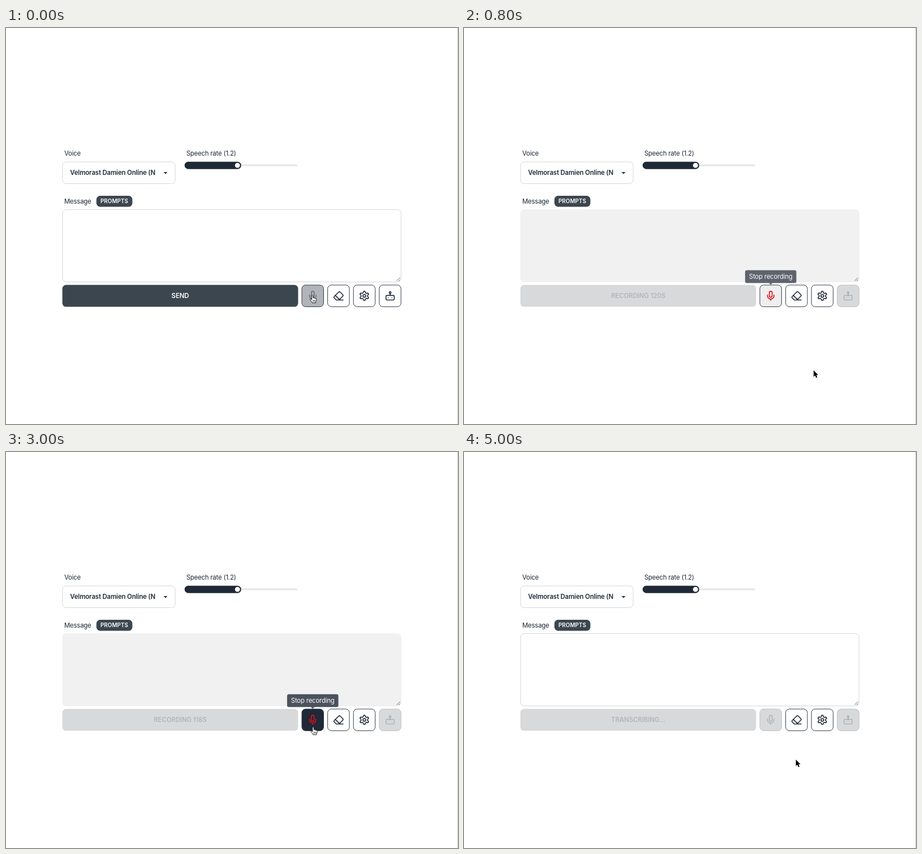
Recreate the animation shown at these times as an HTML page. Size 799 px wide and 701 px high, loop 8000 ms.

```html
<!DOCTYPE html>
<html lang="en">
<head>
<meta charset="utf-8">
<title>Voice message form</title>
<style>
  html, body { margin: 0; width: 100%; height: 100%; overflow: hidden; background: #fff; }
  svg { display: block; width: 100%; height: 100%; }
  text { font-family: Inter, "Open Sans", sans-serif; font-size: 11.38px; letter-spacing: -0.017em; fill: #1f2937; }
  .bold { font-weight: 600; letter-spacing: -0.006em; }
  .mid { text-anchor: middle; }
  .field { fill: #fff; stroke: #d5d6d9; }
  .btn { fill: #fff; stroke: #1f2937; stroke-width: .9; }
  .icon { fill: none; stroke: #1f2937; stroke-width: 2; stroke-linecap: round; stroke-linejoin: round; }
</style>
</head>
<body>
<svg viewBox="0 0 799 701">
  <defs>
    <path id="tooth" d="M-.22-10h.44a2 2 0 0 1 2 2v.18a2 2 0 0 0 1 1.73l.43.25a2 2 0 0 0 2 0l.15-.08a2 2 0 0 1 2.73.73"/>
  </defs>
  <rect width="799" height="701" fill="#fff"/>
  <path d="M798.5 0V701" stroke="#c9c9cb"/>

  <text x="103" y="226">Voice</text>
  <rect class="field" x="100" y="237" width="199" height="38.5" rx="6.5"/>
  <text class="bold" x="113.3" y="260.3" style="letter-spacing:-.012em">Velmorast Damien Online (N</text>
  <path d="M278.6 255h6.8l-3.4 3.6z" fill="#1f2937"/>

  <text x="318.7" y="226">Speech rate (1.2)</text>
  <rect x="316" y="241.6" width="199" height="3.2" rx="1.6" fill="#e7e7e8"/>
  <rect x="315.7" y="236.7" width="100" height="13" rx="6.5" fill="#1f2937"/>
  <circle cx="409.2" cy="243.2" r="4.4" fill="#fff"/>

  <text x="103" y="310.9">Message</text>
  <rect x="159.8" y="297" width="63.6" height="19.5" rx="6.5" fill="#3c464f"/>
  <text class="bold mid" x="191.5" y="310.4" style="font-size:9.8px;fill:#fff;letter-spacing:.01em">PROMPTS</text>

  <rect id="area" class="field" x="100" y="321.5" width="598.3" height="128" rx="6.5"/>
  <path d="M690.5 447.8l6-6M694 448l2.7-2.7" stroke="#55585c" stroke-width=".9" fill="none"/>

  <rect id="send" x="99.6" y="454.8" width="416.8" height="38.8" rx="6.5"/>
  <text id="sendText" class="bold mid" x="308" y="478.2"></text>

  <g id="mic">
    <rect id="micBox" class="btn" x="-19.2" y="-19.2" width="38.4" height="38.4" rx="6.5"/>
    <g id="micIcon" class="icon" transform="scale(.81) translate(-12 -12)">
      <rect x="9" y="2" width="6" height="13" rx="3"/>
      <path d="M19 10v2a7 7 0 0 1-14 0v-2M12 19v3"/>
    </g>
  </g>
  <g transform="translate(587.8 474.2)">
    <rect class="btn" x="-19.2" y="-19.2" width="38.4" height="38.4" rx="6.5"/>
    <path class="icon" transform="scale(.81) translate(-12 -12)" d="M7 21l-4.3-4.3c-1-1-1-2.5 0-3.4l9.6-9.6c1-1 2.5-1 3.4 0l5.6 5.6c1 1 1 2.5 0 3.4L13 21M22 21H7M5 11l9 9"/>
  </g>
  <g transform="translate(633.4 474.2)">
    <rect class="btn" x="-19.2" y="-19.2" width="38.4" height="38.4" rx="6.5"/>
    <g id="gear" class="icon" transform="scale(.81)"><circle r="3"/></g>
  </g>
  <g transform="translate(679 474.2)">
    <rect id="botBox" class="btn" x="-19.2" y="-19.2" width="38.4" height="38.4" rx="6.5"/>
    <g id="botIcon" class="icon" transform="scale(.81) translate(-12 -12)">
      <rect x="3" y="11" width="18" height="10" rx="2"/>
      <circle cx="12" cy="5" r="2"/>
      <path d="M12 7v4M8 16h.01M16 16h.01"/>
    </g>
  </g>

  <g id="tip">
    <rect id="tipBox" y="428.7" height="22.8" rx="3.3" fill="#3d4451"/>
    <path d="M538.7 451.2h7l-3.5 3.3z" fill="#3d4451"/>
    <text id="tipText" class="mid" x="542.2" y="444.1" style="fill:#fff"></text>
  </g>

  <path id="arrow" d="M0 0V11.4L2.6 9L4.5 13.2L6.5 12.3L4.7 8.2H8.2Z" fill="#000" stroke="#fff" stroke-width="1" paint-order="stroke"/>
  <g id="hand" stroke-linecap="round" stroke-linejoin="round">
    <path d="M-1.2 1Q0-.7 1.2 1V5.2Q2.5 4.3 3.5 5.7Q4.8 5 5.6 6.4Q7.2 6 7.3 7.8Q7.4 10.6 6 12.2V14H-.2Q-.7 12.2-2.2 10.6L-4 8.4Q-4.4 6.8-2.6 7L-1.2 8.2Z" fill="#fff" stroke="#111" stroke-width=".95"/>
    <path d="M1.2 9v2.8M3 9v2.8M4.8 9v2.8" stroke="#111" stroke-width=".7"/>
  </g>
</svg>
<script>
const $ = id => document.getElementById(id);
const LOOP = 8000, STEP = 100, FADE = 200;
const WHITE = [255, 255, 255], DARK = [31, 41, 55], SLATE = [60, 70, 79];
const OFF = [216, 217, 219], OFF_EDGE = [186, 188, 192], RED = [216, 16, 24];

// Pointer path: time, x, y of the tip
const PATH = [
  [0, 541.5, 472.5], [600, 541.5, 472.5], [700, 575, 548], [800, 618, 606], [2300, 618, 606],
  [2400, 614, 601], [2500, 591, 570], [2600, 567, 534], [2700, 549, 504], [2800, 543.5, 490],
  [2900, 543, 486.5], [3800, 543, 486.5], [3900, 549, 498], [4000, 564, 519], [4100, 578.3, 536],
  [4200, 583.5, 542], [4300, 585.8, 545.3], [4400, 586.2, 545], [4500, 586.6, 544.6]
];

const clamp = v => Math.max(0, Math.min(1, v));
const mix = (a, b, p) => a.map((v, i) => v + (b[i] - v) * p);
const rgb = (c, a = 1) => `rgba(${c.map(Math.round).join()},${a})`;

// cubic-bezier(0, 0, .2, 1)
function easeOut(x) {
  let lo = 0, hi = 1;
  for (let i = 0; i < 20; i++) {
    const s = (lo + hi) / 2;
    if (.6 * s * s + .4 * s ** 3 < x) lo = s; else hi = s;
  }
  return lo * lo * (3 - 2 * lo);
}
const fade = (t, start) => easeOut(clamp((t - start) / FADE));
const smooth = (t, start, span) => { const p = clamp((t - start) / span); return p * p * (3 - 2 * p); };

// Text colour going to 20% dark, mixed with premultiplied alpha
function dim(from, p) {
  const a = 1 - .8 * p;
  return rgb(from.map((v, i) => (v * (1 - p) + DARK[i] * .2 * p) / a), a);
}

function pointer(t) {
  const i = PATH.findIndex(k => k[0] > t);
  if (i < 0) return PATH[PATH.length - 1].slice(1);
  const a = PATH[i - 1], b = PATH[i];
  return mix(a.slice(1), b.slice(1), (t - a[0]) / (b[0] - a[0]));
}

function press(t, down) {
  const d = t - down;
  return d < 0 || d >= 300 ? 1 : d < 200 ? .97 : 1.02;
}

function paint(el, fill, stroke) {
  el.style.fill = fill;
  el.style.stroke = stroke;
}

function draw(t) {
  const recording = t >= 426 && t < 3780;
  const off = fade(t, 426);
  const micOff = fade(t, 3780);

  paint($('area'), recording ? '#f1f1f1' : '#fff', recording ? '#f1f1f1' : '#d5d6d9');

  $('send').style.fill = rgb(mix(SLATE, OFF, off));
  $('sendText').style.fill = dim(WHITE, off);
  const left = 120 - clamp((t - 500) / 3000) * 3;
  $('sendText').textContent = t < 426 ? 'SEND' : recording ? `RECORDING ${Math.ceil(left)}S` : 'TRANSCRIBING...';

  paint($('botBox'), rgb(mix(WHITE, OFF, off)), rgb(mix(DARK, OFF_EDGE, off)));
  $('botIcon').style.stroke = dim(DARK, off);

  const hover = t < 2000 ? fade(t, -24) - fade(t, 670) : fade(t, 2760);
  const face = mix(mix(WHITE, DARK, hover), OFF, micOff);
  paint($('micBox'), rgb(face), rgb(mix(DARK, OFF_EDGE, micOff)));
  $('micIcon').style.stroke = recording ? rgb(RED) : t < 426 ? rgb(mix(DARK, WHITE, hover)) : dim(DARK, micOff);
  $('mic').setAttribute('transform', `translate(542.2 474.2) scale(${press(t, 300) * press(t, 3600)})`);

  const shown = t < 2000 ? (t >= STEP) - smooth(t, 745, 200) : smooth(t, 2835, 200) - smooth(t, 4110, 185);
  const width = recording ? 90.6 : 92.4;
  $('tip').style.opacity = shown;
  $('tipBox').setAttribute('x', 542.2 - width / 2);
  $('tipBox').setAttribute('width', width);
  $('tipText').textContent = recording ? 'Stop recording' : 'Start recording';

  const [x, y] = pointer(t);
  const over = Math.abs(x - 542.2) < 20 && Math.abs(y - 474.2) < 20;
  for (const id of ['arrow', 'hand']) {
    $(id).setAttribute('transform', `translate(${x} ${y})`);
    $(id).style.display = (id === 'hand') === over ? '' : 'none';
  }
}

for (let a = 0; a < 360; a += 60) {
  const use = document.createElementNS($('gear').namespaceURI, 'use');
  use.setAttribute('href', '#tooth');
  use.setAttribute('transform', `rotate(${a})`);
  $('gear').append(use);
}

const begin = performance.now();
function tick() {
  const t = (performance.now() - begin) % LOOP;
  draw(Math.floor(t / STEP) * STEP);
  requestAnimationFrame(tick);
}
tick();
</script>
</body>
</html>
```
